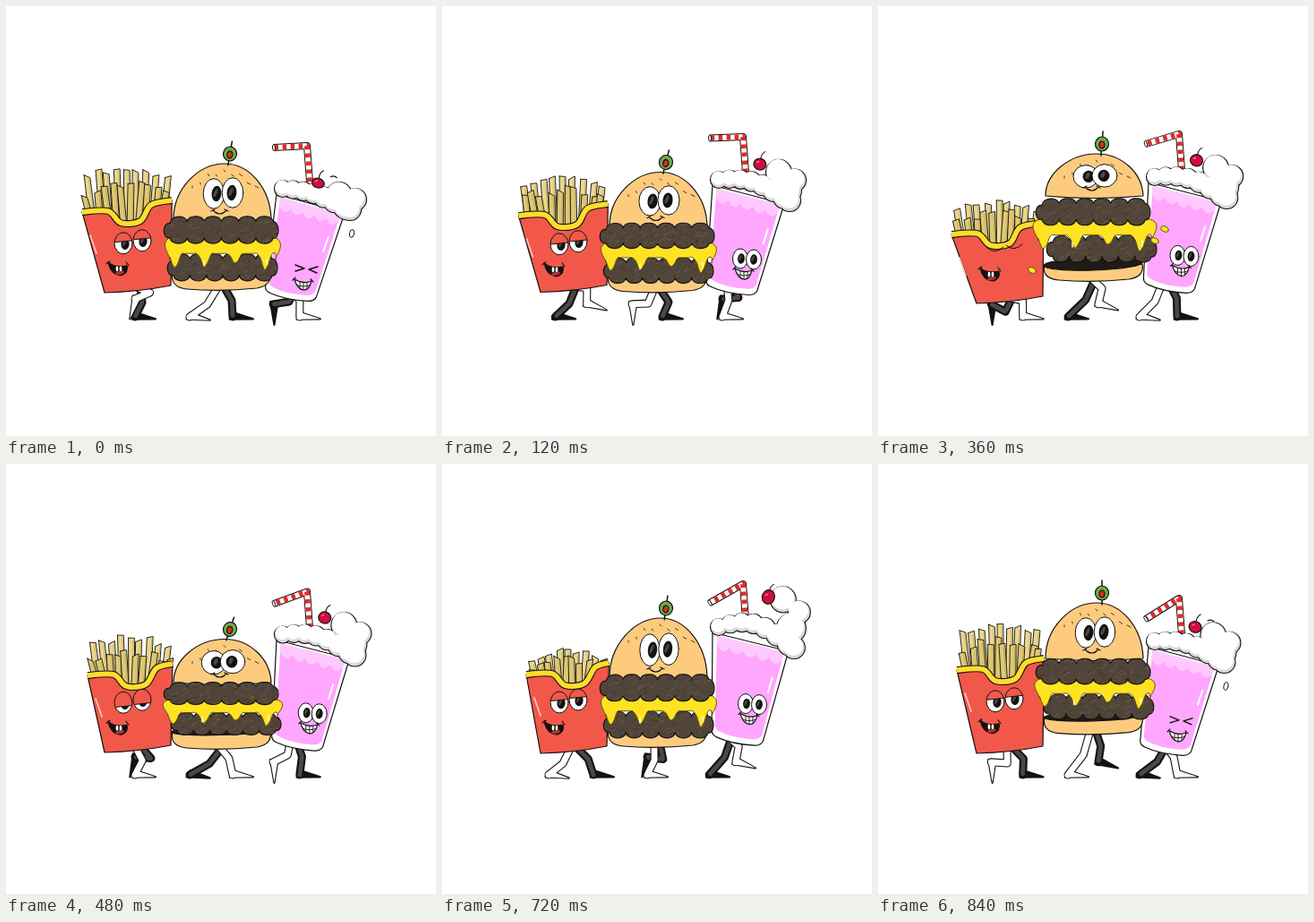
Write an HTML page with a canvas that moves like this. It is 480 px wide and 480 px high and loops after 960 ms.

```html
<!DOCTYPE html>
<html lang="en">
<head>
<meta charset="utf-8">
<title>Walking snacks</title>
<style>
html, body { margin: 0; width: 100%; height: 100%; overflow: hidden; background: #fff; }
canvas { display: block; width: 480px; height: 480px; }
</style>
</head>
<body>
<canvas id="stage" width="480" height="480"></canvas>
<script>
const ctx = document.getElementById('stage').getContext('2d');
const INK = '#141211', RED = '#f1584a', BUN = '#fccb7e', MEAT = '#51453a', CHEESE = '#ffe322';
const BEATS = 8, STEP = 120, GROUND = 349;

// Six key values become eight beats; beats 1 and 4 lie between their neighbours.
const track = (a, b, c, d, e, f) => [a, (a + b) / 2, b, c, (c + d) / 2, d, e, f];

const fries = {
  left: track(85, 86, 82, 100, 94, 88),
  rim: track(230, 238, 255, 217, 235, 230),
  base: track(319, 318, 331, 311, 322, 322),
  height: track(53, 46, 43, 50, 32, 55),
  lid: track(.42, .52, 1, .36, .4, .4)
};
const burger = {
  peak: track(176, 195, 165, 226, 172, 155),
  brim: track(238, 253, 212, 276, 238, 217),
  bottom: track(307, 312, 286, 319, 306, 285),
  open: track(0, 0, 1, 0, 0, .6)
};
const shake = {
  top: track(210, 190, 197, 196, 188, 204),
  rise: track(22, 56, 41, 42, 64, 37),
  droop: track(2, 1, 11, 16, 21, 23)
};

const poseAt = (tracks, beat) =>
  Object.fromEntries(Object.entries(tracks).map(([name, values]) => [name, values[beat]]));

function random(seed) {
  return () => {
    seed = (seed * 1664525 + 1013904223) >>> 0;
    return seed / 4294967296;
  };
}

function paint(path, fill, stroke = INK, width = 1.2) {
  if (fill) { ctx.fillStyle = fill; ctx.fill(path); }
  if (stroke) { ctx.strokeStyle = stroke; ctx.lineWidth = width; ctx.stroke(path); }
}

const line = (d, width = 1.2, color = INK) => paint(new Path2D(d), null, color, width);

function oval(x, y, rx, ry = rx, turn = 0) {
  const path = new Path2D();
  path.ellipse(x, y, rx, ry, turn, 0, 7);
  return path;
}

function poly(points, closed = true) {
  const path = new Path2D();
  points.forEach(([x, y]) => path.lineTo(x, y));
  if (closed) path.closePath();
  return path;
}

function spline(points) {
  const at = i => points[Math.min(points.length - 1, Math.max(0, i))];
  const path = new Path2D();
  path.moveTo(...points[0]);
  for (let i = 0; i < points.length - 1; i++) {
    const [a, b, c, d] = [at(i - 1), at(i), at(i + 1), at(i + 2)];
    path.bezierCurveTo(b[0] + (c[0] - a[0]) / 6, b[1] + (c[1] - a[1]) / 6,
      c[0] - (d[0] - b[0]) / 6, c[1] - (d[1] - b[1]) / 6, c[0], c[1]);
  }
  return path;
}

function inside(path, draw) {
  ctx.save();
  ctx.clip(path);
  draw();
  ctx.restore();
}

// One step: the foot swings forward around beat 0 and slides back on the ground.
function drawLeg(beat, hipX, hipY, centre, stride, color) {
  const wave = shift => Math.cos((beat - shift) * 2 * Math.PI / BEATS);
  const ax = centre + stride * wave(2);
  const ay = GROUND - 2 - 20 * Math.max(0, wave(0));
  const pitch = .1 + 2 * Math.max(0, wave(7.6)) ** 3;
  const dx = ax - hipX, dy = ay - hipY, reach = Math.hypot(dx, dy);
  const bone = Math.max(18, reach / 2 + .5);
  const bend = Math.sqrt(bone * bone - reach * reach / 4) / reach;
  const limb = poly([[hipX, hipY], [hipX + dx / 2 + dy * bend, hipY + dy / 2 - dx * bend], [ax, ay]], false);
  const cos = Math.cos(pitch), sin = Math.sin(pitch);
  const foot = poly([[ax + sin * 5, ay - cos * 5], [ax + cos * 23, ay + sin * 23],
    [ax - sin * 3 - cos * 3, ay + cos * 3 - sin * 3]]);
  paint(limb, null, INK, 9);
  paint(foot, INK, INK, 2.2);
  paint(limb, null, color, 6.8);
  paint(foot, color, null);
  if (color === INK) {
    ctx.setLineDash([.5, 2.6]);
    paint(limb, null, '#4c4845', 5);
    ctx.setLineDash([]);
  }
}

function drawLegs(beat, delay, hipX, hipY, centre, stride) {
  drawLeg(beat - delay + 4, hipX + 3, hipY, centre, stride, INK);
  drawLeg(beat - delay, hipX - 3, hipY, centre, stride, '#fff');
}

function drawEye(x, y, rx, ry, look, lid = 0) {
  if (lid > .9) return line(`M${x - 9} ${y - 1}Q${x} ${y + 7} ${x + 9} ${y - 2}`, 1);
  const ball = oval(x, y, rx, ry);
  inside(ball, () => {
    paint(ball, '#fff', null);
    const px = x + look, py = y + ry * lid * .2;
    paint(oval(px, py, rx * .46, ry * .52, .1), INK, null);
    paint(oval(px - 1, py - 1, rx * .15, ry * .3, .4), '#4b4744', null);
    if (!lid) return;
    const edge = y - ry + 2 * ry * lid;
    paint(poly([[x - 20, y - 20], [x + 20, y - 20], [x + 20, edge - 2], [x - 20, edge + 2]]), RED, INK, 1);
  });
  paint(ball, null, INK, 1);
}

function drawTexture(path, seed, x0, y0, x1, y1, color, count) {
  const rnd = random(seed);
  inside(path, () => {
    for (let i = 0; i < count; i++) {
      line(`M${x0 + rnd() * (x1 - x0)} ${y0 + rnd() * (y1 - y0)}l${2 + rnd() * 3} ${-1 - rnd() * 2}`, .7, color);
    }
  });
}

function drawSticks(p, right, beat) {
  const rnd = random(beat * 97 + 11);
  const floor = p.rim + 17, span = right - p.left;
  for (let row = 0; row < 2; row++) {
    const count = 9 + row;
    for (let i = 0; i < count; i++) {
      const t = (i + .3 + rnd() * .4) / count;
      const edge = Math.abs(t - .5) * 2;
      const x = p.left + 1 + t * (span - 2) + row * (rnd() - .5) * 6;
      const y = p.rim - p.height + rnd() * 9 + edge * edge * 12 + row * p.height * .33;
      const foot = p.left + 9 + t * (span - 16);
      const slant = (rnd() - .5) * 4;
      const stick = poly([[x - 3.6, y + slant], [x + 3.6, y - slant], [foot + 3.4, floor], [foot - 3.4, floor]]);
      paint(stick, row ? '#dec873' : '#ebd78d', INK, .9);
      line(`M${x + 2} ${y + 3}L${foot + 2} ${floor}`, .6, '#b49b50');
    }
  }
}

function drawFries(p, beat) {
  drawLegs(beat, 0, 147, p.base - 6, 144, 25);
  const { left, rim, base } = p, right = 175 + left * .12;
  drawSticks(p, right, beat);
  const edge = spline([[left, rim], [left + 29, rim - 1], [left + 43, rim + 12],
    [left + 65, rim + 10], [left + 77, rim - 8], [right, rim - 13]]);
  const box = new Path2D(edge);
  box.lineTo(184, base - 7);
  box.quadraticCurveTo(148, base, 110, base + 1);
  box.closePath();
  paint(box, RED);
  ctx.lineCap = 'butt';
  paint(edge, null, INK, 8);
  paint(edge, null, '#ffdd2d', 5.8);
  ctx.lineCap = 'round';
  line(`M${left + 9} ${rim + 26}l7 20`, 1.8, '#ffc2b5');

  const eyeY = 266 + (rim - 235) * .25, mouthY = eyeY + 27;
  drawEye(131, eyeY, 10, 12, 2, p.lid);
  drawEye(152, eyeY - 3, 10, 12, 1, p.lid);
  ctx.save();
  ctx.translate(125, mouthY);
  paint(new Path2D('M-11 -6Q-5 1 10 -2Q12 6 4 9Q-8 9 -11 -6Z'), INK);
  paint(oval(2, 6, 5, 2, -.2), '#a93430', null);
  line('M-1 0v3M3 0v3', 2.6, '#fff');
  line('M-13 -4l4 -3M9 -6l3 4');
  ctx.restore();

  if (rim < 220) {
    const rnd = random(5);
    ctx.fillStyle = INK;
    for (let i = 0; i < 22; i++) {
      const angle = Math.PI * (1 + i / 21), spread = .95 + rnd() * .14;
      ctx.fillRect(149 + Math.cos(angle) * 53 * spread, 202 + Math.sin(angle) * 43 * spread, 1.2, 1.2);
    }
  }
}

function drawMeat(x0, x1, y0, y1, seed) {
  const lobes = 6, width = (x1 - x0 - 12) / lobes, h = y1 - y0;
  const path = new Path2D();
  path.moveTo(x0 + 6, y0 + h * .25);
  for (let i = 0; i < lobes; i++) {
    const x = x0 + 6 + i * width;
    path.bezierCurveTo(x + 2, y0 - 2, x + width - 2, y0 - 2, x + width, y0 + h * .18);
  }
  path.bezierCurveTo(x1 + 2, y0 + h * .2, x1 + 2, y1 - h * .15, x1 - 6, y1 - h * .2);
  for (let i = lobes; i > 0; i--) {
    const x = x0 + 6 + i * width;
    path.bezierCurveTo(x - 1, y1 + h * .07, x - width + 1, y1 + h * .07, x - width, y1 - h * .22);
  }
  path.bezierCurveTo(x0 - 3, y1 - h * .15, x0 - 3, y0 + h * .2, x0 + 6, y0 + h * .25);
  paint(path, MEAT);
  drawTexture(path, seed, x0, y0, x1, y1, '#6d604f', 60);
  drawTexture(path, seed + 5, x0, y0, x1, y1, '#3a3027', 35);
}

function drawCheese(x0, x1, y0, y1) {
  const points = [[x0, y1 - 12], [x0 + 4, y0], [x1 - 4, y0], [x1, y1 - 12]];
  for (let i = 28; i >= 0; i--) {
    const u = i / 28;
    const drip = Math.max(0, Math.cos(u * 22 - 1)) ** 2 * (.75 + .25 * Math.sin(u * 9));
    points.push([x0 + u * (x1 - x0), y0 + (y1 - y0) * (.5 + .5 * drip)]);
  }
  const path = spline(points);
  path.closePath();
  paint(path, CHEESE, '#5f5115', 1);
  line(`M${x0 + 38} ${y1 - 10}v5M${x1 - 10} ${y1 - 12}v6`, 1.5, '#fffbd0');
}

function drawBun({ peak, brim }) {
  const h = brim - peak, shoulder = brim - h * .55;
  paint(new Path2D(`M187 ${brim}C187 ${shoulder} 215 ${peak} 244 ${peak}C272 ${peak} 295 ${shoulder} 296 ${brim}Q240 ${brim + 5} 187 ${brim}Z`), BUN);
  for (let i = 0; i < 9; i++) {
    const t = i / 4 - 1;
    line(`M${243 + t * 35} ${peak + 7 + t * t * 18 + i % 2 * 4}l${2 + t * 2} 2`, 1, '#4e371d');
  }
  ctx.save();
  ctx.translate(250, peak - 11);
  ctx.rotate((peak - 155) * .008);
  line('M0 -14V13', 1.5);
  paint(oval(0, 0, 7.5, 8), '#6cab46');
  paint(oval(0, 1, 3, 4), '#d92c26');
  ctx.restore();

  const eyeY = peak + h * .54, ry = h * .27, rx = 21 - ry * .55;
  drawEye(232, eyeY, rx, ry, 3);
  drawEye(253, eyeY - 1, rx, ry, -1);
  line(`M231 ${brim - 10}Q239 ${brim - 2} 246 ${brim - 10}M229 ${brim - 9}l4 -2M244 ${brim - 11}l4 2`);
}

function drawBurger(p, beat) {
  const { brim, bottom, open } = p;
  const soleTop = bottom - 14 + 14 * open, sole = bottom + 10 + 11 * open;
  drawLegs(beat, 2, 240, sole - 4, 229, 24);
  paint(new Path2D(`M186 ${soleTop + 3}Q182 ${sole - 3} 202 ${sole - 1}Q240 ${sole + 2} 280 ${sole - 2}Q298 ${sole - 5} 295 ${soleTop + 2}Z`), BUN);
  if (open) paint(oval(240, soleTop + 2, 55, 3 + open * 4, -.03), '#211b17');
  drawBun(p);

  const top = brim - 3 + 6 * open, meat = (bottom - top) * .42, slide = 8 * open;
  drawMeat(181 + slide, 303 + slide, bottom - meat, bottom, 41 + beat);
  drawCheese(183 - slide / 2, 301 + slide / 2, top + meat * .75, bottom - meat * .4);
  drawMeat(177, 304, top, top + meat, 13 + beat);

  if (brim > 270) {
    const strand = new Path2D('M180 292Q222 290 268 294Q300 289 344 301');
    paint(strand, null, '#5f5115', 7.5);
    paint(strand, null, CHEESE, 5.5);
  }
  if (open === 1) {
    [[172, 295], [320, 249], [309, 262]].forEach(([x, y]) => paint(oval(x, y, 4.5, 3, .4), CHEESE, '#5f5115', 1));
  }
}

function drawCup(top, lift, rimX, rimY) {
  const left = 289 + lift * .55, foot = 318 - lift * .7;
  const at = (u, v) => [
    (302 + (rimX - 302) * u) * (1 - v) + (left + 56 * u) * v,
    (top + (rimY - top) * u) * (1 - v) + (foot + 11 * u) * v];
  const tumbler = (u0, u1, v0, v1) => {
    const path = poly([at(u0, v0), at(u1, v0), at(u1, v1 - .04)], false);
    path.quadraticCurveTo(...at(u1 - .02, v1 + .01), ...at(u1 - .14, v1 + .02));
    path.quadraticCurveTo(...at(.4, v1 + .05), ...at(u0 + .1, v1 + .01));
    path.quadraticCurveTo(...at(u0, v1), ...at(u0, v1 - .05));
    path.closePath();
    return path;
  };
  paint(tumbler(0, 1, 0, 1), '#fff');
  paint(tumbler(.06, .95, .03, .94), '#ffa6ff', null);
  const froth = [at(.06, .02), at(.95, .02)];
  for (let i = 20; i >= 0; i--) froth.push(at(.06 + .89 * i / 20, .11 + .05 * Math.abs(Math.sin(i * .785))));
  paint(poly(froth), '#ffc9ff', null);
  paint(poly([at(.88, .3), at(.87, .46)], false), null, '#fff', 2);
}

function drawStraw(top, droop) {
  const bend = top - 54;
  const straw = poly([[339, top - 14], [336, bend], [299, bend + droop]], false);
  ctx.lineCap = 'butt';
  paint(straw, null, INK, 8);
  paint(straw, null, '#fff', 6);
  ctx.setLineDash([4.5, 4.5]);
  paint(straw, null, '#e02b2b', 6);
  ctx.setLineDash([]);
  ctx.lineCap = 'round';
  paint(oval(299, bend + droop, 1.5, 3.6, -droop / 40), '#fff', INK, 1);
}

function drawCream(top, rimX, rimY, rise) {
  const lobes = [];
  for (let i = 0; i < 7; i++) {
    const u = i / 6;
    lobes.push([309 + u * (rimX - 309), top - 6 + u * (rimY - top) - Math.sin(u * 3) * rise * .22, 9 + u * 3]);
  }
  lobes.push([rimX + 6, rimY - 4, 12], [rimX + 3, rimY - rise * .4, 16],
    [rimX + 12, rimY - rise * .68, 12], [rimX - 6, rimY - rise * .9, 14]);
  const layer = (fill, stroke, dx, dy, trim) =>
    lobes.forEach(([x, y, r]) => paint(oval(x + dx, y + dy, r - trim), fill, stroke, 2.2));
  layer(null, INK, 0, 0, 0);
  layer('#d8d8d8', null, 0, 0, 0);
  layer('#fff', null, -.7, -2, 1.2);
}

function drawShake(p, beat) {
  const { top, rise } = p, lift = 210 - top, rimX = 378 + lift * .4, rimY = top + 21;
  drawLegs(beat, 5, 321, 314 - lift * .5, 313, 21);
  drawCup(top, lift, rimX, rimY);
  drawStraw(top, p.droop);
  drawCream(top, rimX, rimY, rise);

  const cherryX = 340 + rise * .38, cherryY = top + 2 - rise * .65;
  line(`M${cherryX + 1} ${cherryY - 5}q0 -6 5 -9`, 1.1);
  paint(oval(cherryX, cherryY, 7, 4 + rise * .06, .3), '#cf0d3e');
  line(`M${cherryX - 3} ${cherryY - 2}l2 -1`, 1.2, '#ff8fa7');

  const x = 335 + lift * .5, y = 294 - lift * 1.2;
  if (top > 201) {
    line(`M${x - 12} ${y - 5}l10 4l-10 3M${x + 13} ${y - 3}l-10 3l9 4`, 1.4);
    paint(oval(rimX + 8, rimY + 23, 2.5, 4.5, .2), '#fff', INK, 1);
    line(`M${cherryX + 14} ${cherryY - 7}q4 -2 7 1`);
  } else {
    drawEye(x - 7, y, 8.5, 11, 1);
    drawEye(x + 8, y + 1, 8.5, 11, 0);
  }
  ctx.save();
  ctx.translate(x - 3, y + 17);
  const grin = new Path2D('M-10 -6Q0 0 9 -4Q6 7 0 6Q-7 5 -10 -6Z');
  paint(grin, '#fff');
  inside(grin, () => line('M-9 0Q0 4 9 0M-4 -6v12M0 -6v13M4 -6v12', .9));
  line('M-12 -5l3 -3M8 -6l3 3');
  ctx.restore();
}

ctx.lineJoin = ctx.lineCap = 'round';
const start = performance.now();
let shown = -1;

function play() {
  const beat = Math.floor((performance.now() - start) / STEP) % BEATS;
  if (beat !== shown) {
    shown = beat;
    ctx.clearRect(0, 0, 480, 480);
    drawFries(poseAt(fries, beat), beat);
    drawShake(poseAt(shake, beat), beat);
    drawBurger(poseAt(burger, beat), beat);
  }
  requestAnimationFrame(play);
}
play();
</script>
</body>
</html>
```
